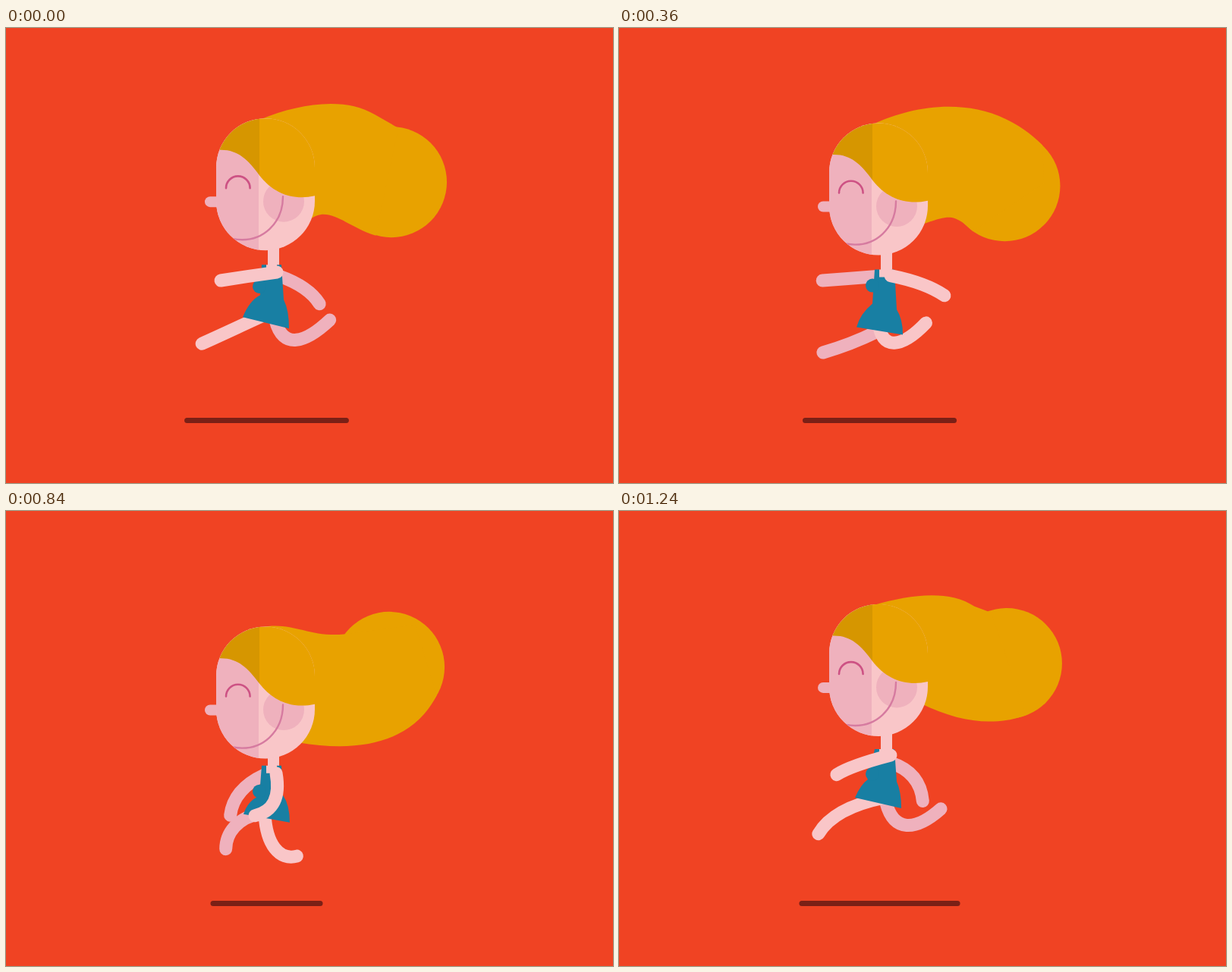
Animation of 800x600 px, one loop 1.28 s. Source, as an HTML page without scripts:

```html
<!DOCTYPE html>
<html lang="en">
<head>
<meta charset="utf-8">
<title>Running girl</title>
<style>
  html, body { margin: 0; width: 100%; height: 100%; overflow: hidden; background: #f04323; }
  svg { display: block; width: 800px; height: 600px; }
  .limb { fill: none; stroke-width: 17; stroke-linecap: round; stroke-linejoin: round; }
  .near { stroke: #f9c6c8; }
  .far { stroke: #efb1bd; }
  .skin { fill: #f9c6c8; }
  .shade { fill: #efb1bd; }
  .hair { fill: #e8a200; }
  .hair-dark { fill: #d69600; }
  .dress { fill: #187fa3; }
  .line { fill: none; stroke-linecap: round; }
</style>
</head>
<body>
<svg viewBox="0 0 800 600">
  <defs>
    <clipPath id="skull">
      <path id="face" d="M277 184a65 65 0 0 1 130 0v44a65 65 0 0 1-130 0z"/>
    </clipPath>
  </defs>
  <rect width="800" height="600" fill="#f04323"/>

  <!-- ground shadow: shrinks at each landing -->
  <g transform="translate(343.5 517.5)">
    <path class="line" stroke="#7a2016" stroke-width="7" d="M-105 0H105">
      <animate attributeName="d" dur="640ms" repeatCount="indefinite" values="
        M-105 0H105;M-101 0H101;M-86 0H86;M-64 0H64;M-47 0H47;M-70 0H70;M-90 0H90;M-101 0H101;
        M-105 0H105;M-98.5 0H98.5;M-80 0H80;M-46.5 0H46.5;M-66 0H66;M-84 0H84;M-95 0H95;M-102.5 0H102.5;
        M-105 0H105"/>
    </path>
  </g>

  <!-- body -->
  <g>
    <animateTransform attributeName="transform" type="translate" dur="320ms" repeatCount="indefinite"
      values="0,0;0,6;0,27;0,51;0,46;0,24;0,10;0,2;0,0"/>

    <path class="limb far" d="M360 327Q399 341 413 364">
      <animate attributeName="d" dur="640ms" repeatCount="indefinite"
        keyTimes="0;.0625;.1875;.3125;.4375;.5;.5625;.6875;.8125;.9375;1" values="
        M360 327Q399 341 413 364;
        M358 320Q397 329 420 346;
        M352 326Q368 365 412 369;
        M341 324Q300 343 296 378;
        M342 320Q288 334 270 346;
        M341 322Q304 327 267 333;
        M340 321Q304 324 268 327;
        M340 326Q298 322 280 286;
        M341 322Q350 368 322 376;
        M358 330Q397 343 400 381;
        M360 327Q399 341 413 364"/>
    </path>

    <path class="limb far" d="M355 385C365 425 395 415 427 385">
      <animate attributeName="d" dur="640ms" repeatCount="indefinite"
        keyTimes="0;.0625;.1875;.3125;.4375;.5;.5625;.6875;.75;.8125;.9375;1" values="
        M355 385C365 425 395 415 427 385;
        M352 379C355 422 385 414 415 382;
        M350 379C330 419 333 417 373 410;
        M335 375C305 381 290 401 290 422;
        M350 376C307 385 279 401 266 424;
        M345 376C316 389 287 403 258 416;
        M340 394C315 406 290 415 268 421;
        M349 384C346 408 343 432 340 456;
        M349 380C349 410 358 436 370 456;
        M350 376C354 416 368 436 397 427;
        M352 383C362 421 390 421 424 391;
        M355 385C365 425 395 415 427 385"/>
    </path>

    <path class="limb near" d="M345 376C316 389 287 403 258 416">
      <animate attributeName="d" dur="640ms" repeatCount="indefinite"
        keyTimes="0;.0625;.1875;.25;.3125;.4375;.5;.5625;.6875;.8125;.9375;1" values="
        M345 376C316 389 287 403 258 416;
        M340 394C315 406 290 415 266 421;
        M344 384C341 408 338 432 335 456;
        M341 380C340 410 349 436 361 456;
        M341 376C343 416 360 438 383 432;
        M342 383C352 423 380 421 414 391;
        M345 385C355 425 385 415 417 385;
        M342 379C345 422 375 414 405 382;
        M342 379C322 419 325 417 365 410;
        M345 375C310 380 278 394 285 423;
        M350 376C305 385 276 401 263 424;
        M345 376C316 389 287 403 258 416"/>
    </path>

    <path class="dress" d="M337 312h6v9h14v-9h6L366 358Q373 372 373 396L312 381Q321 359 335 352z">
      <animate attributeName="d" dur="320ms" repeatCount="indefinite"
        keyTimes="0;.125;.375;.625;.875;1" values="
        M337 312h6v9h14v-9h6L366 358Q373 372 373 396L312 381Q321 359 335 352z;
        M337 312h6v9h14v-9h6L366 365Q374 378 374 398L313 388Q318 370 334 357z;
        M337 312h6v9h14v-9h6L366 347Q380 365 380 388L318 388Q322 366 335 353z;
        M337 312h6v9h14v-9h6L365 351Q374 364 374 387L313 376Q319 358 334 352z;
        M337 312h6v9h14v-9h6L366 355Q372 368 372 390L311 376Q318 359 329 351z;
        M337 312h6v9h14v-9h6L366 358Q373 372 373 396L312 381Q321 359 335 352z"/>
    </path>
    <circle class="dress" cx="334" cy="341" r="9">
      <animate attributeName="cy" dur="320ms" repeatCount="indefinite"
        keyTimes="0;.125;.375;.625;.875;1" values="341;333;339;346;345;341"/>
    </circle>
    <path class="skin" d="M345 270h15v42h-3v10h-14v-10h2z"/>

    <path class="limb near" d="M357 322Q320 327 283 333">
      <animate attributeName="d" dur="640ms" repeatCount="indefinite"
        keyTimes="0;.0625;.1875;.3125;.4375;.5;.5625;.6875;.8125;.9375;1" values="
        M357 322Q320 327 283 333;
        M357 321Q321 325 285 327;
        M357 326Q315 322 297 286;
        M356 322Q364 370 327 378;
        M358 326Q404 340 408 381;
        M358 324Q405 337 421 364;
        M358 320Q405 329 429 346;
        M358 326Q375 365 420 369;
        M359 323Q313 343 311 378;
        M358 320Q305 334 287 346;
        M357 322Q320 327 283 333"/>
    </path>
  </g>

  <!-- head -->
  <g>
    <animateTransform attributeName="transform" type="translate" dur="320ms" repeatCount="indefinite"
      values="0,0;0,6;0,27;0,52;0,53;0,34;0,16;0,4;0,0"/>

    <circle class="hair" cx="508" cy="203" r="73">
      <animate attributeName="cx" dur="320ms" repeatCount="indefinite"
        values="508;508;526;524;518;505;506;511;508"/>
      <animate attributeName="cy" dur="320ms" repeatCount="indefinite"
        values="203;202;191;174;166;172;184;197;203"/>
    </circle>
    <path class="hair" d="M336 120C385 100 445 90 484 113L516 130L488 274C448 262 425 232 400 253z">
      <animate attributeName="d" dur="320ms" repeatCount="indefinite"
        keyTimes="0;.125;.25;.375;.625;.875;1" values="
        M336 120C385 100 445 90 484 113L516 130L488 274C448 262 425 232 400 253z;
        M336 120C395 92 490 78 559 149L560 200L466 262C440 237 435 240 400 252z;
        M336 120C412 112 440 86 525 110L562 140L490 255C462 240 455 250 395 259z;
        M336 119C430 126 410 96 490 96L550 105L505 244C480 238 470 258 390 264z;
        M336 120C375 111 400 134 445 129L540 116L568 209C540 264 480 288 385 272z;
        M336 120C385 106 435 100 468 122L490 130L538 265C495 281 450 276 398 250z;
        M336 120C385 100 445 90 484 113L516 130L488 274C448 262 425 232 400 253z"/>
    </path>

    <path class="line far" stroke-width="14" d="M269 229H282"/>
    <use href="#face" class="skin"/>
    <g clip-path="url(#skull)">
      <path class="shade" d="M270 110H333V300H270z"/>
      <circle class="shade" cx="366" cy="228.500" r="27"/>
      <path class="line" stroke="#d67ba0" stroke-width="2.400" d="M299 278C340 285 365 255 365 222"/>
      <path class="hair-dark" d="M270 110H334V194C318 172 303 158 277 161z"/>
      <path class="hair" d="M334 110H410V220.500C380 228 353 219 334 194z"/>
    </g>
    <path class="line" stroke="#cd5284" stroke-width="2.600" d="M290 211a15.800 15.800 0 0 1 31.600 0"/>
  </g>
</svg>
</body>
</html>
```
